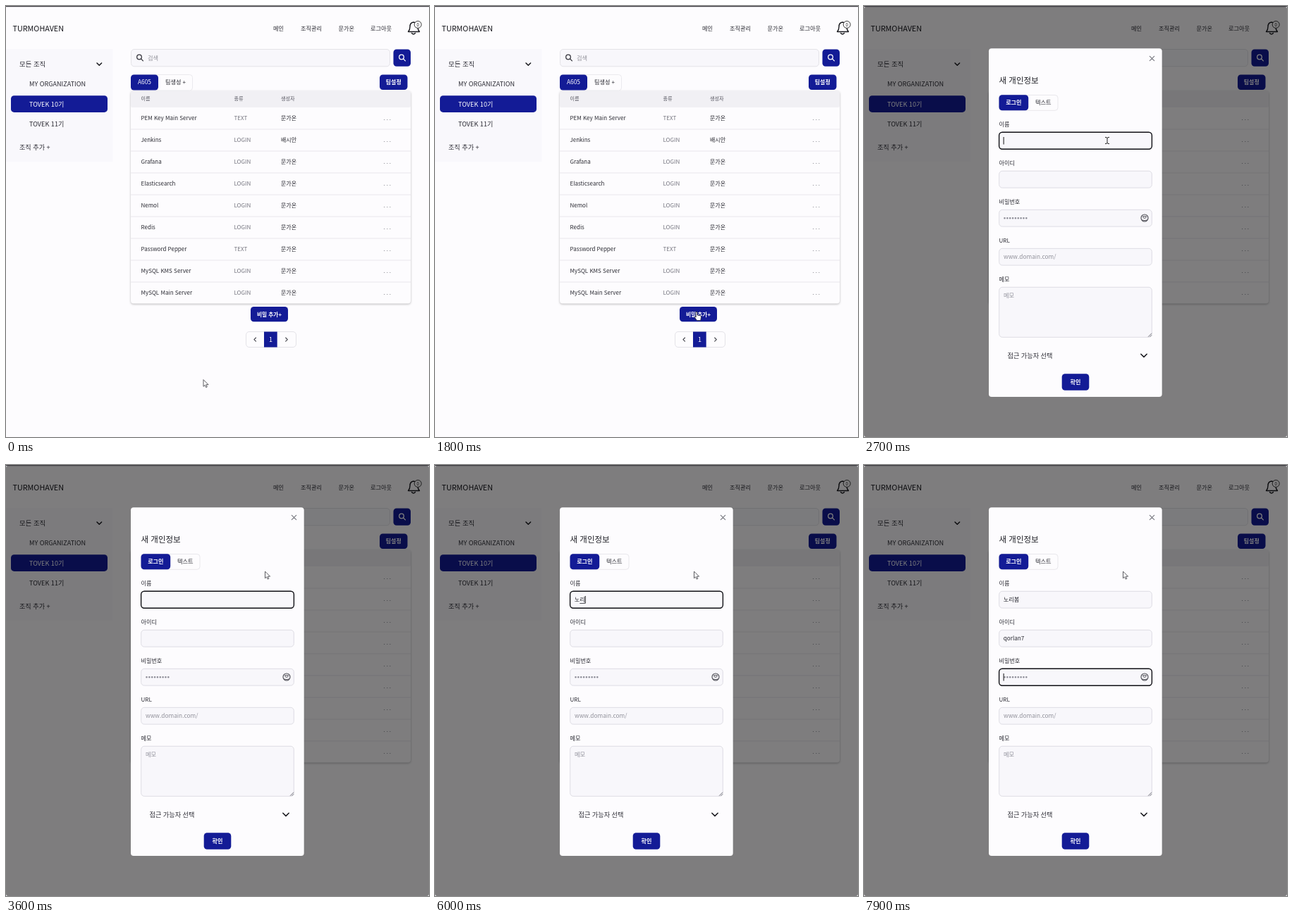
Write an HTML page that moves like this. It is 600x612 px and loops after 8000 ms.

```html
<!DOCTYPE html>
<html lang="ko">
<head>
<meta charset="utf-8">
<style>
html, body { margin: 0; width: 100%; height: 100%; overflow: hidden; background: #fdfcfe; }
svg { display: block; font-family: "Noto Sans CJK KR", "Noto Sans CJK", sans-serif; }
text { white-space: pre; }
</style>
</head>
<body>
<svg id="stage" width="600" height="612" viewBox="0 0 600 612"></svg>
<script>
const BLUE = '#131b96', INK = '#2b2b33', GRAY = '#74747e', LINE = '#e4e3e8', FIELD = '#f8f7fb', PAGE = '#fdfcfe';
const OWNER = '문가온';

const text = (x, y, str, size = 8.2, fill = INK, weight = 400, anchor = 'start', extra = '') =>
  `<text x="${x}" y="${y}" font-size="${size}" fill="${fill}" font-weight="${weight}" text-anchor="${anchor}" ${extra}>${str}</text>`;
const box = (x, y, w, h, r = 0, fill = 'none', stroke = 'none', extra = '') =>
  `<rect x="${x}" y="${y}" width="${w}" height="${h}" rx="${r}" fill="${fill}" stroke="${stroke}" ${extra}/>`;
const path = (d, stroke = INK, width = 1, fill = 'none', extra = '') =>
  `<path d="${d}" fill="${fill}" stroke="${stroke}" stroke-width="${width}" stroke-linecap="round" stroke-linejoin="round" ${extra}/>`;
const button = (x, y, w, h, label, size = 7.9, weight = 700) =>
  box(x, y, w, h, 4.5, BLUE) + text(x + w / 2, y + h / 2 + 2.9, label, size, '#fff', weight, 'middle');
const magnifier = (x, y, color) =>
  `<circle cx="${x - 1}" cy="${y - 1}" r="3.3" fill="none" stroke="${color}" stroke-width="1.3"/>` +
  path(`M${x + 1.6} ${y + 1.6}l2.8 2.8`, color, 1.3);

function header() {
  const nav = [[379, '메인'], [418, '조직관리'], [471.5, OWNER], [517, '로그아웃']];
  return box(0, 0, 600, 1.2, 0, '#3d3c42') +
    text(9.5, 36, 'TURMOHAVEN', 10.8, '#15151b', 500) +
    nav.map(([x, label]) => text(x, 35, label)).join('') +
    path('M570.5 36.5q2.5-2.5 2.5-7q0-6 5-6.5q6 .5 6 7q0 4 2.5 6.5z', '#17171c', 1.4) +
    path('M575.5 38.5q2.5 3 5 0', '#17171c', 1.4) +
    `<circle cx="584.2" cy="26.4" r="5" fill="${PAGE}" stroke="#222" stroke-width=".9"/>` +
    text(584.2, 28.6, '0', 6, '#222', 400, 'middle');
}

function sidebar() {
  return box(0, 61, 151.5, 160, 0, '#f9f8fc') +
    text(19, 86, '모든 조직', 9.4) +
    path('M129 81l3.3 3.3l3.3-3.3', '#17171c', 1.5) +
    text(33, 114.4, 'MY ORGANIZATION', 9.1) +
    box(7, 127.3, 137, 23.6, 4.5, BLUE) +
    text(33, 142.6, 'TOVEK 10기', 9.1, '#fff', 500) +
    text(33, 170.8, 'TOVEK 11기', 9.1) +
    text(19, 203.6, '조직 추가 +', 9.1);
}

function table() {
  const rows = ['PEM Key Main Server', 'Jenkins', 'Grafana', 'Elasticsearch', 'Nemol', 'Redis',
    'Password Pepper', 'MySQL KMS Server', 'MySQL Main Server'];
  const heads = [[191.5, '이름'], [323.5, '종류'], [390, '생성자']];
  return box(177, 120.5, 397, 302, 4, PAGE, 'none', 'style="filter:drop-shadow(0 1px 1.5px #0004)"') +
    box(177, 120.5, 397, 23.5, 2, '#f1f0f4') +
    heads.map(([x, label]) => text(x, 134, label, 7.1, '#55555f', 500)).join('') +
    rows.map((name, i) => {
      const y = 161.8 + 31 * i;
      return text(191.5, y, name, 8) +
        text(323.5, y, /^P/.test(name) ? 'TEXT' : 'LOGIN', 8, GRAY) +
        text(390, y, i === 1 ? '배시안' : OWNER, 8, INK, 500) +
        text(535.5, y, '...', 8, GRAY, 400, 'start', 'letter-spacing="1.9"') +
        (i < 8 ? box(177, y + 12.7, 397, 1, 0, '#e9e8ed') : '');
    }).join('');
}

function page() {
  return box(0, 0, 600, 612, 0, PAGE) + header() + sidebar() +
    box(177.5, 61.5, 367, 24.3, 4.5, FIELD, LINE) + magnifier(190, 73.5, '#33333b') +
    text(201, 76.5, '검색', 8.2, '#92929b') +
    box(549.5, 61.5, 24.5, 24.3, 4.5, BLUE) + magnifier(562, 73.5, '#fff') +
    table() +
    box(177.5, 97.5, 87, 22.5, 4, PAGE, '#ebeaee') +
    button(177, 97.5, 39, 22, 'A605', 8.4, 500) + text(226, 111.4, '팀생성 +', 8.1) +
    button(530, 97.5, 39.5, 21.5, '팀설정') +
    button(347, 427, 53, 21.3, '비밀 추가+', 7.7) +
    box(340.5, 462.5, 71, 22, 4.5, PAGE, LINE) + box(366, 462.5, 18.7, 22, 0, BLUE) +
    path('M354.5 471l-2.6 2.6l2.6 2.6M396.7 471l2.6 2.6l-2.6 2.6', '#44444c', 1.1) +
    text(375.4, 476.8, '1', 9, '#fff', 400, 'middle');
}

const FIELD_TOPS = [179.3, 234.3, 289.3, 344.3];
const fieldBox = y => box(191.7, y, 216.6, 23.8, 4.5, FIELD, '#dedde4');

function modal() {
  const labels = ['이름', '아이디', '비밀번호', 'URL', '메모'];
  return box(0, 1, 600, 611, 3, '#000', 'none', 'opacity=".5"') +
    box(177, 60.3, 245.7, 494.7, 4, PAGE) +
    path('M405.3 71.3l6.4 6.4m0-6.4l-6.4 6.4', '#75757d', 1.1) +
    text(191.5, 110, '새 개인정보', 11.5, '#1e1e25') +
    box(191.5, 126.5, 83.5, 21.8, 4, PAGE, '#e9e8ec') +
    button(191.5, 126.3, 41.7, 22, '로그인', 8.1) + text(254.3, 140.2, '텍스트', 8.2, INK, 400, 'middle') +
    labels.map((label, i) => text(191.5, 171 + 55 * i, label, 8.1)).join('') +
    FIELD_TOPS.map(fieldBox).join('') +
    box(191.7, 399.3, 216.6, 71, 4.5, FIELD, '#dedde4') +
    path('M199.5 301.2h32', '#8d8d97', 2.6, 'none', 'stroke-dasharray="0 3.85"') +
    `<circle cx="398" cy="301" r="5" fill="none" stroke="#44444c" stroke-width="1.1"/>` +
    path('M395.6 299a2.4 2.4 0 1 0 4.8 0zM394.5 304q3.5 1.5 7 0', '#44444c', .9) +
    text(198, 359, 'www.domain.com/', 8.3, '#92929b') +
    text(198, 413.8, '메모', 8.2, '#92929b') +
    path('M403.3 469.5l4.5-4.5m-2 4.5l2-2', '#55555d', .8) +
    text(203.5, 499.6, '접근 가능자 선택', 9.15) +
    path('M392.8 494.2l4.2 4.2l4.2-4.2', '#17171c', 1.5) +
    button(280.7, 522.3, 38.6, 23.5, '확인', 8.1) +
    box(191.6, 0, 216.8, 24, 4.5, 'none', '#111116', 'id="ring" stroke-width="1.4"') +
    text(197.7, 193.9, '', 8.2, INK, 400, 'start', 'id="name"') +
    text(197.7, 248.9, '', 8.2, INK, 400, 'start', 'id="login"') +
    box(0, 196.2, 7.5, .8, 0, INK, 'none', 'id="compose"') +
    box(0, 0, 1, 10.5, 0, '#111', 'none', 'id="caret"');
}

const POINTERS = {
  arrow: path('M0 0v9.3l2.2-2l1.5 3.3l1.6-.7l-1.5-3.2h2.9z', '#4a4a50', .9, '#fff'),
  beam: path('M-2.6-4.6q2.6 0 2.6 1.2q0-1.2 2.6-1.2M0-3.5v7M-2.6 4.6q2.6 0 2.6-1.2q0 1.2 2.6 1.2', '#222', 1),
  hand: path('M-1 .8q1-1.5 2 0v4l4.6 1.2q1.2.5.9 2l-.8 4.5h-5.2l-3.3-4.6q0-1.5 1.8-.4z', '#26262c', .8, '#fff')
};

const $ = id => document.getElementById(id);
const show = (id, on) => $(id).setAttribute('visibility', on ? 'inherit' : 'hidden');
const put = (id, attrs) => Object.entries(attrs).forEach(([key, value]) => $(id).setAttribute(key, value));

$('stage').innerHTML = page() + `<g id="modal">${modal()}</g>` +
  Object.entries(POINTERS).map(([id, shape]) => `<g id="${id}">${shape}</g>`).join('');

// Each entry: start time, value
const NAME_TYPING = [[0, ''], [3100, 'ㅆ'], [3600, ''], [4900, 'ㅆ'], [5200, 'ㄴ'], [5500, '노'], [5700, '놀'],
  [5900, '노리'], [6100, '노립'], [6300, '노리보'], [6500, '노리봄']];
const FOCUS = [[0, -1], [2600, 0], [6700, 1], [7800, 2]];
const CARET = [[0, true], [3600, false], [4200, true], [4700, false], [4900, true]];
const ROUTE = [[0, 280, 531], [900, 434, 427], [1400, 386, 436], [1800, 371, 434], [1900, 374.5, 442],
  [2500, 345, 191], [2700, 345, 191], [2900, 367.5, 151.5]];
const LOGIN = 'qorlan7';

const current = (list, t) => list.filter(([start]) => start <= t).pop()[1];

function pointerAt(t) {
  const next = ROUTE.findIndex(([time]) => time > t);
  if (next < 0) return ROUTE[ROUTE.length - 1].slice(1);
  const [t0, x0, y0] = ROUTE[next - 1], [t1, x1, y1] = ROUTE[next];
  const k = (t - t0) / (t1 - t0), ease = k * k * (3 - 2 * k);
  return [x0 + (x1 - x0) * ease, y0 + (y1 - y0) * ease];
}

function pointerShape(x, y, open) {
  const within = (left, top, right, bottom) => x > left && x < right && y > top && y < bottom;
  if (!open) return within(347, 427, 400, 448) ? 'hand' : 'arrow';
  const overField = within(191, 399, 409, 471) || FIELD_TOPS.some(top => within(191, top, 409, top + 24));
  return overField ? 'beam' : 'arrow';
}

function draw(t) {
  const open = t >= 1900, focus = current(FOCUS, t), name = current(NAME_TYPING, t);
  show('modal', open);
  $('name').textContent = name;
  $('login').textContent = t < 7100 ? '' : LOGIN.slice(0, Math.min(7, 2 + (t - 7100) / 100));

  show('ring', focus >= 0);
  show('caret', focus >= 0 && current(CARET, t));
  show('compose', focus === 0 && name);
  if (focus >= 0) {
    const top = FIELD_TOPS[focus];
    const width = focus < 2 ? $(['name', 'login'][focus]).getComputedTextLength() : 0;
    put('ring', { y: top - .1 });
    put('caret', { x: 197.6 + width, y: top + 6.7 });
    put('compose', { x: 197.7 + width - 7.5 });
  }

  const [x, y] = pointerAt(t), shape = pointerShape(x, y, open);
  Object.keys(POINTERS).forEach(id => show(id, id === shape));
  put(shape, { transform: `translate(${x} ${y})` });
}

function tick() {
  draw(Math.floor(performance.now() % 8000 / 100) * 100);
  requestAnimationFrame(tick);
}
tick();
</script>
</body>
</html>
```
